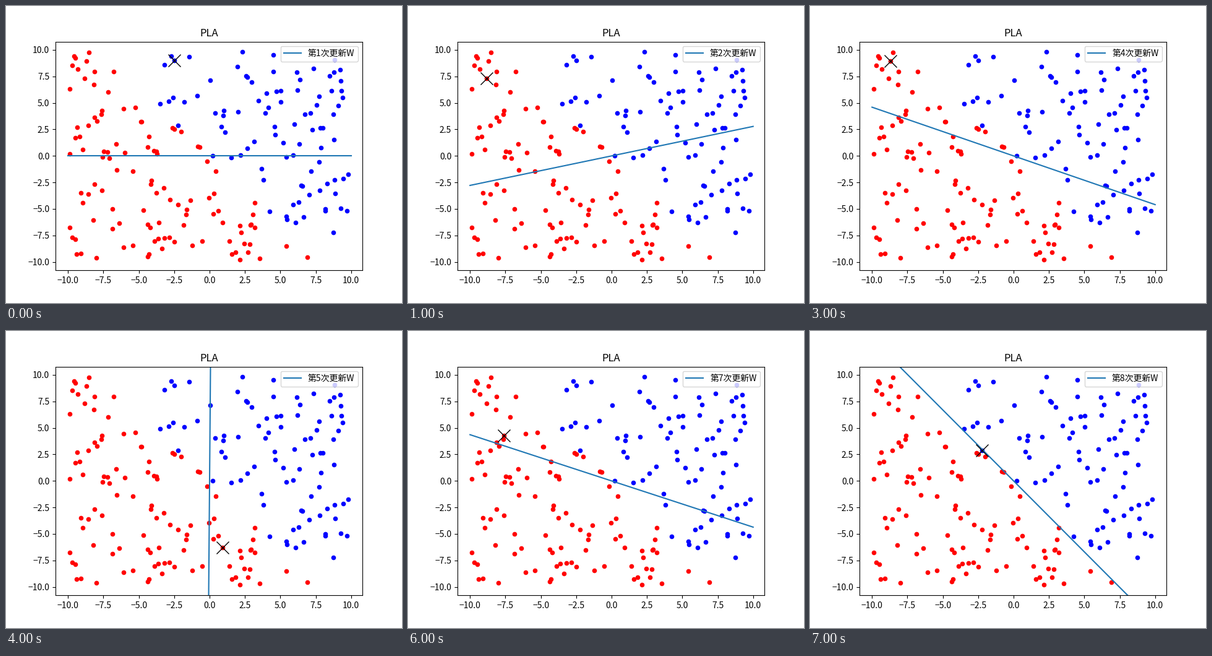
Recreate the animation shown at these times as a matplotlib script. Size 640x480 px, loop 8000 ms.

```python
import numpy as np
import matplotlib.pyplot as plt
from matplotlib.animation import FuncAnimation

STEPS = 8
plt.rcParams["font.family"] = "Noto Sans CJK JP"

# Two classes of random points, split by a line through the origin.
points = np.random.RandomState(42).uniform(-10, 10, (200, 2))
labels = np.where(points @ (1.265, 1.0) > 0, 1, -1)


def train(steps):
    """Perceptron: sweep the points, yield weights and each misclassified point."""
    w = np.zeros(2)
    history = []
    i = 0
    while len(history) < steps:
        p, label = points[i], labels[i]
        if label * (w @ p) <= 0:
            history.append((w, p))
            w = w + label * p
        i = (i + 1) % len(points)
    return history


history = train(STEPS)

fig, ax = plt.subplots(figsize=(6.4, 4.8), dpi=100)
ax.set_title("PLA")
for label, color in ((1, "blue"), (-1, "red")):
    ax.scatter(*points[labels == label].T, s=20, color=color)
ax.set(xlim=ax.get_xlim(), ylim=ax.get_ylim())

xs = np.array([-10.0, 10.0])
boundary, = ax.plot(xs, 0 * xs, color="#1f77b4", label="第1次更新W")
cross, = ax.plot([], [], "kx", markersize=14)
legend = ax.legend(loc="upper right")


def update(step):
    w, p = history[step]
    slope = -w[0] / w[1] if w[1] else 0.0
    boundary.set_ydata(slope * xs)
    cross.set_data([p[0]], [p[1]])
    legend.get_texts()[0].set_text(f"第{step + 1}次更新W")
    return boundary, cross, legend


anim = FuncAnimation(fig, update, frames=STEPS, interval=1000,
                     repeat=True, repeat_delay=0, blit=False)
plt.show()
```
